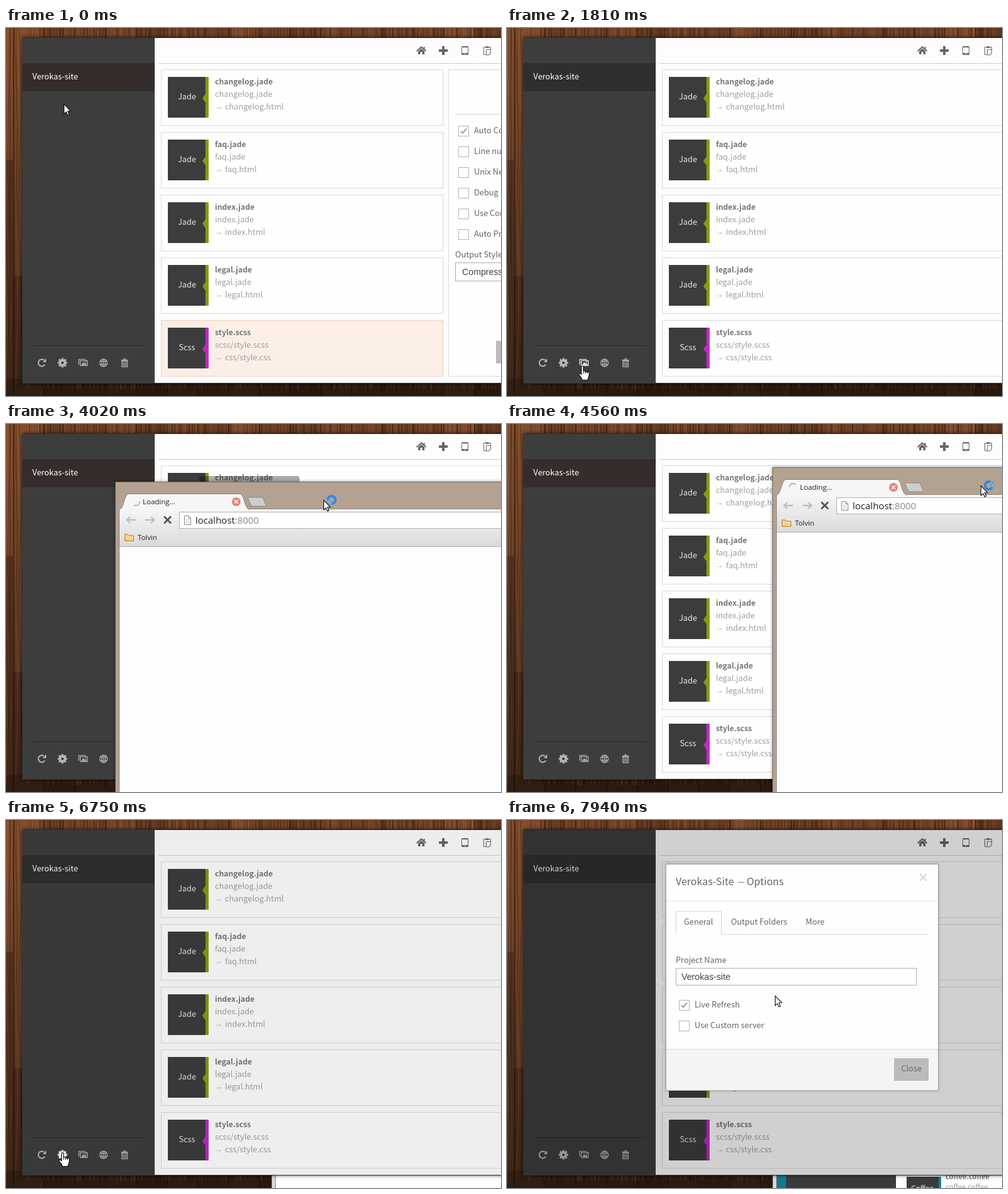
Recreate the animation shown at these times as an HTML page with a canvas. Size 789 by 587 pixels, loop 8 s.

```html
<!DOCTYPE html>
<html lang="en">
<head>
<meta charset="utf-8">
<title>Project options</title>
<style>
html, body { margin: 0; width: 100%; height: 100%; overflow: hidden; background: #4a2f22; }
canvas { display: block; }
</style>
</head>
<body>
<canvas id="stage" width="789" height="587"></canvas>
<script>
const W = 789, H = 587, LOOP = 8000;
const stage = document.getElementById('stage');
let c = stage.getContext('2d');

const UI = '"Noto Sans CJK JP", "Noto Sans CJK SC", "Noto Sans CJK", "Open Sans", sans-serif';
const CHROME = '"Open Sans", "Noto Sans", sans-serif';
const FORM = '"Liberation Sans", Arial, sans-serif';

// Screen updates come in bursts: [first, last, count]
const BURSTS = [[150, 1090, 8], [1230, 2220, 8], [2340, 2490, 2], [2760, 3720, 8],
  [3870, 4820, 8], [4940, 5890, 8], [6010, 7050, 8], [7200, 7940, 6]];

// Pointer hot spot: [time, x, y]
const POINTER = [[150, 92, 121], [1000, 92, 530], [1300, 92, 530], [1700, 120, 539],
  [2230, 120, 539], [2480, 151, 539], [2750, 151, 539], [3300, 395, 130], [3500, 395, 130],
  [3990, 506, 121], [4130, 506, 121], [4540, 755, 98], [4810, 680, 118], [5600, 607, 155],
  [5740, 607, 155], [5880, 97, 319], [6150, 90, 530], [6600, 90, 530], [7040, 182, 340],
  [7190, 182, 340], [7900, 427, 280]];
const WINDOW = [[4130, 174, 92], [4540, 423, 69]];

function snap(t) {
  let last = 0;
  for (const [a, b, n] of BURSTS) {
    if (t < a) break;
    const step = (b - a) / (n - 1);
    last = a + step * Math.min(n - 1, Math.floor((t - a) / step));
  }
  return last;
}

const clamp = v => Math.max(0, Math.min(1, v));
const ease = v => v * v * (3 - 2 * v);

function along(keys, t) {
  let a = keys[0];
  for (const b of keys) {
    if (t < b[0]) {
      if (a === b) break;
      const k = ease((t - a[0]) / (b[0] - a[0]));
      return [a[1] + (b[1] - a[1]) * k, a[2] + (b[2] - a[2]) * k].map(Math.round);
    }
    a = b;
  }
  return [a[1], a[2]];
}

function rect(x, y, w, h, color) {
  c.fillStyle = color;
  c.fillRect(x, y, w, h);
}

function frame(x, y, w, h, fill, line) {
  rect(x, y, w, h, line);
  rect(x + 1, y + 1, w - 2, h - 2, fill);
}

function text(s, x, y, color, size = 12.8, family = UI, weight = 400, align = 'left') {
  c.font = `${weight} ${size}px ${family}`;
  c.textAlign = align;
  c.fillStyle = color;
  c.fillText(s, x, y);
}

function path(points, fill, line, width = 1) {
  c.beginPath();
  for (let i = 0; i < points.length; i += 2) c.lineTo(points[i], points[i + 1]);
  if (fill) { c.closePath(); c.fillStyle = fill; c.fill(); }
  if (line) { c.strokeStyle = line; c.lineWidth = width; c.stroke(); }
}

function ring(x, y, r, color, width, from = 0, to = Math.PI * 2) {
  c.beginPath();
  c.arc(x, y, r, from, to);
  c.strokeStyle = color;
  c.lineWidth = width;
  c.stroke();
}

function disc(x, y, r, color) {
  c.beginPath();
  c.arc(x, y, r, 0, Math.PI * 2);
  c.fillStyle = color;
  c.fill();
}

function pill(x, y, w, h, r, color) {
  c.beginPath();
  c.roundRect(x, y, w, h, r);
  c.fillStyle = color;
  c.fill();
}

function cross(x, y, r, color, width) {
  path([x - r, y - r, x + r, y + r], null, color, width);
  path([x + r, y - r, x - r, y + r], null, color, width);
}

function fade(y0, y1, top, bottom) {
  const g = c.createLinearGradient(0, y0, 0, y1);
  g.addColorStop(0, top);
  g.addColorStop(1, bottom);
  return g;
}

function makeWood() {
  const cv = document.createElement('canvas');
  cv.width = W;
  cv.height = H;
  const screen = c;
  c = cv.getContext('2d');
  let seed = 7;
  const rnd = () => (seed = seed * 16807 % 2147483647) / 2147483647;
  rect(0, 0, W, H, fade(0, H, '#85502f', '#49301f'));
  for (let x = -38; x < W; x += 49) {
    rect(x, 0, 49, H, `rgba(25,10,5,${rnd() * .32})`);
    const joint = x < 0 ? 210 : 60 + rnd() * 440;
    rect(x, joint, 49, H, 'rgba(20,8,5,.28)');
    for (let i = 0; i < 34; i++) {
      const gx = x + rnd() * 49, amp = rnd() * 2.5, phase = rnd() * 6;
      const tone = rnd() < .65 ? '30,12,6' : '165,98,62';
      c.beginPath();
      for (let y = 0; y <= H; y += 12) c.lineTo(gx + amp * Math.sin(y / 55 + phase), y);
      c.strokeStyle = `rgba(${tone},${.08 + rnd() * .24})`;
      c.lineWidth = .6 + rnd() * 1.4;
      c.stroke();
    }
    rect(x, 0, 1.5, H, 'rgba(20,8,4,.55)');
  }
  rect(0, 560, W, 27, 'rgba(15,8,6,.25)');
  c = screen;
  return cv;
}

const wood = makeWood();

const SIDE_ICONS = [
  col => {
    ring(0, 0, 5.5, col, 2, .5, 5.4);
    path([1.5, -1, 7, -1, 7, -7], col);
  },
  col => {
    for (let i = 0; i < 8; i++) {
      c.save();
      c.rotate(i * Math.PI / 4);
      rect(-1.6, -7.5, 3.2, 4, col);
      c.restore();
    }
    ring(0, 0, 3.9, col, 3.6);
  },
  col => {
    c.strokeStyle = col;
    c.lineWidth = 1.2;
    c.strokeRect(-4.5, -3.5, 11, 8);
    path([-7, 3, -7, -5.5, 4, -5.5], null, col, 1.2);
    path([-3, 3.5, 0, -1, 2, 1.5, 3.5, 0, 5.5, 3.5], col);
    disc(3.5, -1.5, 1, col);
  },
  col => {
    ring(0, 0, 6, col, 1.2);
    c.beginPath();
    c.ellipse(0, 0, 2.8, 6, 0, 0, Math.PI * 2);
    c.stroke();
    path([0, -6, 0, 6], null, col);
    for (const y of [-2.5, 2.5]) path([-5.5, y, 5.5, y], null, col);
  },
  col => {
    rect(-5.5, -5, 11, 1.6, col);
    rect(-2, -7, 4, 1.4, col);
    c.strokeStyle = col;
    c.lineWidth = 1.3;
    c.strokeRect(-4.2, -2.6, 8.4, 9);
    for (const x of [-2, 0, 2]) path([x, -1, x, 5], null, col);
  }
];

function at(x, y, draw) {
  c.save();
  c.translate(x, y);
  draw();
  c.restore();
}

function toolbar() {
  const col = '#666';
  rect(243, 56, W, 1, '#cfcfcf');
  at(662, 36, () => {
    path([-7.5, 1, 0, -6, 7.5, 1], null, col, 2);
    rect(3.5, -6, 2, 4, col);
    path([-5, 1, 0, -3.5, 5, 1, 5, 6, 1.5, 6, 1.5, 2, -1.5, 2, -1.5, 6, -5, 6], col);
  });
  rect(690, 34, 14, 4, col);
  rect(695, 29, 4, 14, col);
  at(731, 36, () => {
    pill(-5, -7, 11, 14, 1.5, col);
    rect(-4, -5, 9, 9, '#fdfdfd');
    rect(-.5, 5, 2, 1, '#fdfdfd');
  });
  at(767, 36, () => {
    path([-2, 6.5, -5.5, 6.5, -5.5, -5.5, 5.5, -5.5, 5.5, -2], null, '#777', 1.2);
    rect(-2.5, -7, 5, 3, '#777');
    path([-1.5, -1.5, 5.5, -1.5, 5.5, 4, 2.5, 7, -1.5, 7, -1.5, -1.5], null, '#777', 1.2);
  });
}

const FILES = ['changelog', 'faq', 'index', 'legal'].map(n =>
  ['Jade', n + '.jade', n + '.jade', n + '.html', '#8a9a0c']);
FILES.push(['Scss', 'style.scss', 'scss/style.scss', 'css/style.css', '#c128c8']);

function fileRow([kind, name, src, out, color], y, right, state) {
  frame(247, y, right - 247, 90, state === 'picked' ? '#fbeee7' : '#fefefe',
    state === 'picked' ? '#f2cfc0' : '#dadada');
  if (state === 'hover') rect(247, y, right - 247, 1, '#f5d3cd');
  rect(258, y + 12, 60, 65, '#3c3c3c');
  rect(318, y + 12, 5, 65, color);
  path([318, y + 39, 313, y + 46, 318, y + 53], color);
  text(kind, 288.5, y + 48, '#e6e6e6', 12.8, UI, 400, 'center');
  text(name, 333, y + 24, '#777', 12.2, UI, 700);
  text(src, 333, y + 44, '#a0a0a0');
  text('→', 333, y + 63, '#a0a0a0', 12, FORM);
  text(out, 349, y + 64, '#a0a0a0');
}

function checkbox(x, y, label, on) {
  frame(x, y, 17, 17, '#fff', '#b5b5b5');
  if (on) path([x + 4, y + 8.5, x + 7, y + 11.5, x + 13, y + 4.5], null, '#aaa', 2.4);
  text(label, x + 25, y + 12, '#666');
}

function sidePanel() {
  frame(705, 66, 200, 490, '#fefefe', '#dadada');
  rect(716, 137, 80, 1, '#d0d0d0');
  ['Auto Compile', 'Line numbers', 'Unix Newlines', 'Debug Info', 'Use Compass', 'Auto Prefix']
    .forEach((s, i) => checkbox(721, 156 + 33 * i, s, i === 0));
  text('Output Style', 716, 366, '#666');
  frame(716, 374, 120, 30, '#fff', '#aaa');
  text('Compressed', 727, 394, '#444', 14.2, FORM);
  rect(781, 499, 30, 36, '#bbb');
}

function app(t) {
  c.save();
  c.shadowColor = 'rgba(0,0,0,.75)';
  c.shadowBlur = 5;
  rect(26, 15, W, 552, '#3d3d3d');
  c.restore();
  rect(237, 16, W, 550, '#fdfdfd');
  rect(26, 15, W, 1, '#33302e');
  const warm = t < 1000 || (t > 3800 && t < 6600);
  rect(26, 56, 211, 45, warm ? '#342d2b' : '#2f2f2f');
  text('Verokas-site', 42, 82, '#fff', 12.8);
  rect(42, 506, 180, 1, '#292929');

  const [px, py] = along(POINTER, t);
  SIDE_ICONS.forEach((icon, i) => {
    const x = [57, 90, 123, 155.5, 189][i];
    const over = py > 524 && Math.abs(px - x) < 9;
    at(x, 534, () => icon(over ? '#fff' : '#b8b8b8'));
  });

  toolbar();
  const open = t < 560;
  FILES.forEach((f, i) => {
    let state = '';
    if (open && i === 4) state = 'picked';
    if (i === 0 && t > 3280 && t < 4140) state = 'hover';
    fileRow(f, 66 + 100 * i, open ? 697 : W + 20, state);
  });
  if (open) sidePanel();

  if (t >= 2750 && t < 3430) {
    c.globalAlpha = clamp((t - 2620) / 260);
    pill(102, 483, 108, 31, 4, '#0d0d0d');
    path([151, 514, 161, 514, 156, 519], '#0d0d0d');
    text('Open project live url', 156, 501, '#fff', 9.2, UI, 700, 'center');
    c.globalAlpha = 1;
  }
  if (t > 3800 && t < 4140) pill(308, 83, 160, 24, 4, 'rgba(0,0,0,.33)');
  const dim = .18 * clamp((t - 6500) / 300);
  if (dim) rect(26, 15, W, 552, `rgba(0,0,0,${dim})`);
}

function navArrow(x, dir) {
  at(x, 61, () => {
    c.scale(dir, 1);
    path([-7, 0, 7, 0], null, '#bdbdbd', 2.4);
    path([2, -5, 7.5, 0, 2, 5], null, '#bdbdbd', 2.2);
  });
}

function loadedPage() {
  rect(7, 470, 15, 60, '#0b8494');
  for (let i = 0; i < 5; i++) rect(9 + i * 3, 470, 1, 60, 'rgba(0,60,80,.35)');
  rect(22, 470, 175, 60, '#3b3b3f');
  rect(214, 500, 55, 40, '#3a3a3a');
  rect(265, 500, 4, 40, '#0b8494');
  text('Coffee', 239, 523, '#eee', 12, UI, 400, 'center');
  text('coffee.coffee', 276, 504, '#777', 11.2, UI, 700);
  text('coffee.coffee', 276, 521, '#a0a0a0', 11.4);
}

function browser(t) {
  const [x, y] = along(WINDOW, t);
  const behind = t >= 6000;
  c.save();
  c.translate(x, y);
  c.globalAlpha = clamp((t - 3450) / 230);
  c.shadowColor = 'rgba(0,0,0,.45)';
  c.shadowBlur = 5;
  rect(0, 0, W, H, behind ? '#d9d9d9' : '#b3a292');
  c.shadowColor = 'transparent';
  rect(0, 0, W, 1, '#75685d');
  rect(0, 0, 1, H, '#75685d');
  rect(6, 44, 1, H, '#8d8279');
  rect(7, 44, W, 60, fade(44, 104, '#f6f6f6', '#dadada'));
  rect(7, 103, W, 1, '#aaa');
  rect(7, 104, W, H, '#fdfdfd');

  c.beginPath();
  c.moveTo(7, 44);
  c.bezierCurveTo(14, 44, 14, 20, 22, 19.5);
  c.lineTo(199, 19.5);
  c.bezierCurveTo(206, 20, 206, 44, 214, 44);
  c.fillStyle = '#f6f6f6';
  c.fill();
  c.strokeStyle = '#8d8279';
  c.lineWidth = 1;
  c.stroke();
  path([214, 43.5, W, 43.5], null, '#8d8279');
  path([211, 25, 235, 25, 241, 39, 217, 39, 211, 25], '#ccced0', '#8f877f');

  const spin = t / 160;
  ring(33, 32, 6, '#a9b8d8', 2, spin, spin + 2.2);
  text('Loading...', 44, 36, '#222', 11.5, CHROME);
  disc(193, 32, 7, '#e1857c');
  cross(193, 32, 2.8, '#fff', 1.5);

  navArrow(26, -1);
  navArrow(55, 1);
  cross(83.5, 61, 5.5, '#555', 2.8);
  frame(102, 48, W, 27, '#fff', '#b0b0b0');
  path([110.5, 54.5, 117, 54.5, 120.5, 58, 120.5, 68.5, 110.5, 68.5, 110.5, 54.5], '#fff', '#888');
  path([117, 54.5, 117, 58.5, 120.5, 58.5], null, '#888');
  for (let i = 0; i < 3; i++) rect(112.5, 60 + i * 2.5, 6, 1, '#ccc');
  text('localhost', 128, 67, '#222', 15, CHROME);
  text(':8000', 128 + c.measureText('localhost').width, 67, '#888', 15, CHROME);

  path([15.5, 84, 20, 84, 22, 86, 29.5, 86, 29.5, 94.5, 15.5, 94.5, 15.5, 84], '#f7cf7c', '#a8823c');
  rect(17, 88, 12, 1, '#fde9b5');
  text('Tolvin', 36, 93, '#222', 11.3, CHROME);
  if (t > 7600) loadedPage();
  c.restore();
}

function modal(t) {
  const k = clamp((t - 7100) / 380);
  if (!k) return;
  c.save();
  c.globalAlpha = k;
  c.translate(0, Math.round(-43 * (1 - ease(k))));
  c.shadowColor = 'rgba(0,0,0,.25)';
  c.shadowBlur = 4;
  rect(253, 70, 435, 362, '#a5a5a5');
  c.shadowColor = 'transparent';
  rect(254, 71, 433, 360, '#fefefe');
  text('Verokas-Site', 269, 104, '#666', 16);
  text('—', 367.5, 103, '#666', 13);
  text('Options', 382, 104, '#666', 16);
  cross(663.5, 91.5, 5.5, '#c8c8c8', 1.5);
  rect(254, 129, 433, 1, '#e5e5e5');

  rect(269, 182, 403, 1, '#d8d8d8');
  frame(269, 145, 73, 38, '#fefefe', '#d8d8d8');
  rect(270, 182, 71, 1, '#fefefe');
  text('General', 282, 167, '#666');
  text('Output Folders', 357, 167, '#666');
  text('More', 476, 167, '#666');

  text('Project Name', 269, 228, '#666');
  frame(269, 236, 384, 28, '#fff', '#b0b0b0');
  text('Verokas-site', 278, 255, '#444', 14.2, FORM);
  checkbox(274, 287, 'Live Refresh', true);
  checkbox(274, 320, 'Use Custom server', false);

  rect(254, 365, 433, 66, '#f4f4f4');
  rect(254, 365, 433, 1, '#ddd');
  rect(617, 380, 55, 36, '#bbb');
  text('Close', 644.5, 401, '#666', 12.8, UI, 400, 'center');
  c.restore();
}

function hand() {
  c.beginPath();
  c.moveTo(-1.5, 1.5);
  c.quadraticCurveTo(0, -1, 1.8, 1.5);
  c.lineTo(1.8, 8);
  for (const x of [5, 8, 11]) c.quadraticCurveTo(x - 1, 5.5 + x / 4, x, 9 + x / 8);
  c.lineTo(11, 15);
  c.quadraticCurveTo(10, 18, 8.5, 22.5);
  c.lineTo(0, 22.5);
  c.quadraticCurveTo(-1.5, 18, -5.5, 14);
  c.quadraticCurveTo(-5.5, 10.5, -1.5, 13.5);
  c.closePath();
  c.fillStyle = '#fff';
  c.fill();
  c.strokeStyle = '#111';
  c.lineWidth = 1.2;
  c.stroke();
  for (const x of [1.8, 5, 8]) path([x, 8, x, 12], null, '#111');
}

function pointer(t) {
  const [x, y] = along(POINTER, t);
  const isHand = (t > 940 && t < 3640) || (t > 6130 && t < 6700);
  at(x, y, () => {
    if (isHand) return hand();
    path([.5, .5, .5, 16, 4, 12.8, 6.4, 18, 8.8, 17, 6.4, 11.8, 11, 11.5, .5, .5], '#fff', '#111', 1.1);
    if (t > 3640 && t < 4560) {
      ring(13, 0, 6, '#2d8ae0', 4);
      ring(13, 0, 6, '#7cc4fa', 2, t / 150, t / 150 + 1.6);
    }
  });
}

function draw(now) {
  const t = snap(now % LOOP);
  c.drawImage(wood, 0, 0);
  const shown = t > 3500, appFront = t >= 6000;
  if (shown && appFront) browser(t);
  app(t);
  if (shown && !appFront) browser(t);
  modal(t);
  pointer(t);
}

const start = performance.now();
function tick() {
  draw(performance.now() - start);
  requestAnimationFrame(tick);
}
tick();
</script>
</body>
</html>
```
